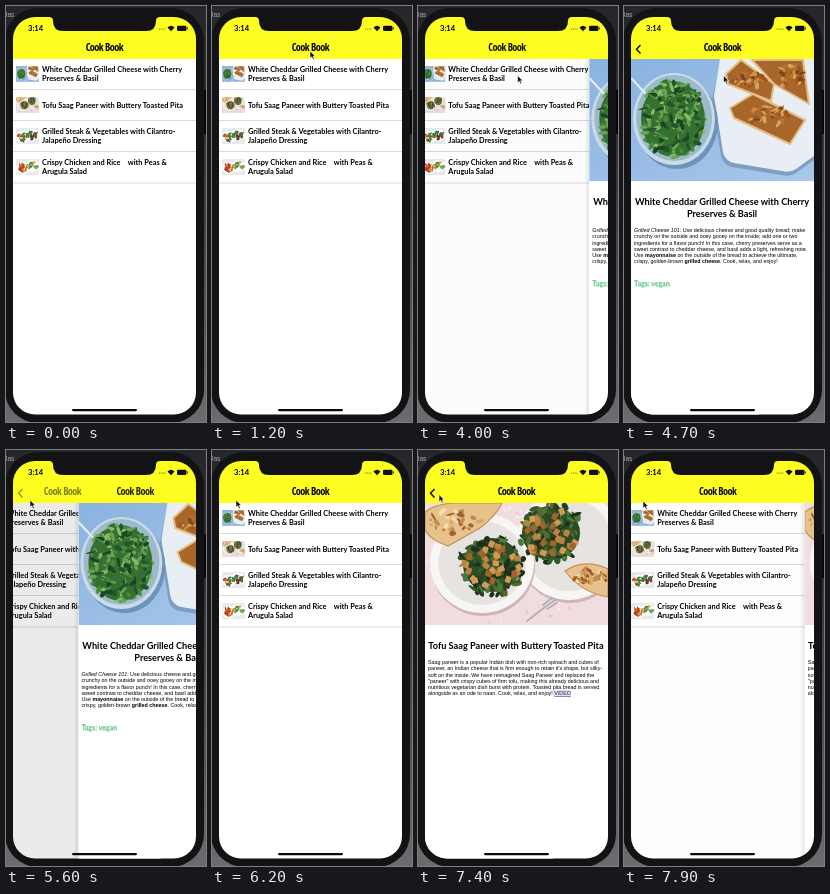
Recreate the animation shown at these times as an HTML page. Size 200x416 px, loop 8 s.

```html
<!DOCTYPE html>
<html lang="en">
<head>
<meta charset="utf-8">
<title>Cook Book</title>
<style>
  html, body { margin: 0; width: 100%; height: 100%; overflow: hidden; background: #222; }
  svg { display: block; width: 200px; height: 416px; }
  .bold { font-family: Lato, sans-serif; font-weight: 700; white-space: pre; }
  .row { font-size: 7.4px; }
  .heading { font-size: 9.2px; text-anchor: middle; }
  .title { font: 700 10.3px "Open Sans Condensed", "Roboto Condensed", Lato, sans-serif; letter-spacing: -.6px; text-anchor: middle; }
  .body { font: 5.35px "Liberation Sans", Arial, sans-serif; }
  .tags { font-size: 7px; fill: #74c79a; text-shadow: .5px .7px .8px #a5dfbf; }
</style>
</head>
<body>
<svg id="stage" viewBox="0 0 200 416" xmlns="http://www.w3.org/2000/svg"></svg>
<script>
const LOOP = 8000, STEP = 100, WIDTH = 183;
const BEZEL = '#131315', INK = '#111';

let seed = 7;
const random = () => (seed = (seed * 16807) % 2147483647) / 2147483647;
const pick = list => list[Math.floor(random() * list.length)];
const repeat = (n, make) => Array.from({ length: n }, (_, i) => make(i)).join('');
const rect = (x, y, w, h, fill, extra = '') =>
  `<rect x="${x}" y="${y}" width="${w}" height="${h}" fill="${fill}" ${extra}/>`;
const oval = (x, y, rx, ry, fill, extra = '') =>
  `<ellipse cx="${x}" cy="${y}" rx="${rx}" ry="${ry}" fill="${fill}" ${extra}/>`;
const shape = (d, fill, extra = '') => `<path d="${d}" fill="${fill}" ${extra}/>`;
const text = (x, y, cls, content) => `<text x="${x}" y="${y}" class="${cls}">${content}</text>`;

// Scatter small rotated blobs inside an ellipse.
const scatter = (n, x, y, rx, ry, colors, w, h, square) => repeat(n, () => {
  const a = random() * 2 * Math.PI, r = Math.sqrt(random());
  const px = x + rx * r * Math.cos(a), py = y + ry * r * Math.sin(a);
  const turn = `transform="rotate(${random() * 180} ${px} ${py})"`;
  return square
    ? rect(px - w / 2, py - h / 2, w, h, pick(colors), `rx="1" ${turn}`)
    : oval(px, py, w * (.5 + random()), h * (.5 + random()), pick(colors), turn);
});

const GREENS = ['#24552a', '#34702f', '#478a3c', '#66a352', '#1c4525'];
const SPINACH = ['#26401f', '#345a2a', '#1b2f19', '#56682f', '#4a7a3a'];
const CRUST = ['#b8722c', '#cd8f45', '#7c431b', '#d9a75f', '#95561f'];

const toast = d => shape(d, '#a9662a', 'stroke="#e3bd86" stroke-width="2" stroke-linejoin="round"');
const crumbs = (x, y, rx, ry) => scatter(32, x, y, rx, ry, CRUST, 2.6, 1.5);

function cheeseHero() {
  return rect(7, 53, WIDTH, 122, 'url(#blue)')
    + shape('M96 56H190V154L172 167Q166 171 158 169L108 161Q99 159 97 150L88 94Z', '#7d9fc5')
    + shape('M96 53H190V150L172 163Q166 167 158 165L110 157Q101 155 99 146L90 90Z', '#e9eef4')
    + oval(53, 117, 41, 46, '#6e93ba')
    + oval(50, 113, 41, 46, '#c9dbe6')
    + oval(50, 112, 38, 43, '#9dbacb')
    + oval(49, 113, 32, 38, '#34702f')
    + scatter(200, 49, 113, 33, 39, [...GREENS, '#86ba68'], 3.6, 1.6)
    + shape('M8 73L21 87', 'none', 'stroke="#e2ebf2" stroke-width="2.2" stroke-linecap="round"')
    + toast('M128 54H179L185 98L150 78Z') + crumbs(166, 71, 14, 12)
    + toast('M102 68L117 54L150 78L147 95L104 78Z') + crumbs(125, 74, 17, 8)
    + toast('M106 102L129 88L181 114L166 138L110 112Z') + crumbs(145, 110, 22, 10);
}

const naan = (d, x, y, rx, ry) => shape(d, '#e6c28c', 'stroke="#c98f52" stroke-width="1.2"')
  + scatter(36, x, y, rx, ry, ['#c58a4b', '#f3ddb5', '#d9aa6b', '#a2602f'], 3, 1.6);
const saag = (x, y) => oval(x, y, 29, 27, '#2c4a24')
  + scatter(110, x, y, 32, 30, SPINACH, 4, 2)
  + scatter(30, x, y, 28, 25, ['#bd8140', '#a26428', '#d29a55'], 6.5, 5.5, true);
const plate = (x, y, rx, ry) => oval(x + 1, y + 3, rx, ry, '#cdb5bb')
  + oval(x, y, rx, ry, '#f8f6f4') + oval(x, y, rx * .84, ry * .84, '#e6e3e0');

function tofuHero() {
  return rect(7, 53, WIDTH, 122, '#f1dde0')
    + scatter(160, 98, 114, 92, 61, ['#f8ecee', '#e6c8ce'], 2.4, .9)
    + plate(151, 95, 53, 55) + plate(64, 113, 52, 50)
    + naan('M7 62Q18 53 40 53H84Q78 66 62 78L30 96Q12 90 7 80Z', 38, 70, 26, 14)
    + saag(133, 83) + saag(74, 115)
    + naan('M147 121Q166 108 190 119V147Q164 143 147 121Z', 173, 127, 16, 9)
    + shape('M109 171L127 157M127 157L137 150M125 155L134 148M129 159L139 153', 'none',
        'stroke="#b5b0b6" stroke-width="1.8" stroke-linecap="round"');
}

const smallDish = (y, left, right) => rect(10, y, 23, 16, '#e8ebe9', 'rx="1"')
  + oval(17, y + 9, 7, 6, '#fff') + oval(26, y + 7, 7, 6, '#fff')
  + scatter(22, 17, y + 9, 5, 4, left, 1.5, 1) + scatter(22, 26, y + 7, 5, 4, right, 1.5, 1);
const thumbnail = (id, y) =>
  `<use href="#${id}" transform="translate(10 ${y}) scale(.1257 .131) translate(-7 -53)"/>`;

const ROWS = [
  [65.5, 'White Cheddar Grilled Cheese with Cherry', 'Preserves &amp; Basil'],
  [101.5, 'Tofu Saag Paneer with Buttery Toasted Pita'],
  [127.5, 'Grilled Steak &amp; Vegetables with Cilantro-', 'Jalapeño Dressing'],
  [158.7, 'Crispy Chicken and Rice \u2003with Peas &amp;', 'Arugula Salad']
];

function listView() {
  return rect(7, 53, WIDTH, 357, '#fff')
    + ROWS.map(([y, ...lines]) => lines.map((s, i) => text(36, y + i * 9.4, 'bold row', s)).join('')).join('')
    + [83, 114, 145, 176.5].map(y => rect(7, y, WIDTH, 1, '#d9d9d9')).join('')
    + thumbnail('cheese', 60) + thumbnail('tofu', 91)
    + smallDish(122, ['#b5432b', '#3d7e3c', '#d99a3c'], ['#5a3021', '#3d7e3c', '#7c4a30'])
    + smallDish(153, ['#c93d25', '#e0852f', '#8b4a22'], ['#3d7e3c', '#79a753', '#d9a24e']);
}

const paragraph = (y, lines) => lines.map((s, i) => text(10, y + i * 6.22, 'body', s)).join('');

const cheesePage = () => '<use href="#cheese"/>'
  + text(98, 199, 'bold heading', 'White Cheddar Grilled Cheese with Cherry')
  + text(98, 211.3, 'bold heading', 'Preserves &amp; Basil')
  + paragraph(226.2, [
    '<tspan font-style="italic">Grilled Cheese 101</tspan>: Use delicious cheese and good quality bread; make',
    'crunchy on the outside and ooey gooey on the inside; add one or two',
    'ingredients for a flavor punch! In this case, cherry preserves serve as a',
    'sweet contrast to cheddar cheese, and basil adds a light, refreshing note.',
    'Use <tspan font-weight="700">mayonnaise</tspan> on the outside of the bread to achieve the ultimate,',
    'crispy, golden-brown <tspan font-weight="700">grilled cheese</tspan>. Cook, relax, and enjoy!'
  ])
  + text(10, 280, 'bold tags', 'Tags: vegan');

const tofuPage = () => '<use href="#tofu"/>'
  + text(98, 199, 'bold heading', 'Tofu Saag Paneer with Buttery Toasted Pita')
  + rect(135, 240.3, 18, 5.8, '#dfe1e8')
  + paragraph(214.2, [
    'Saag paneer is a popular Indian dish with iron-rich spinach and cubes of',
    'paneer, an Indian cheese that is firm enough to retain it\'s shape, but silky-',
    'soft on the inside. We have reimagined Saag Paneer and replaced the',
    '"paneer" with crispy cubes of firm tofu, making this already delicious and',
    'nutritious vegetarian dish burst with protein. Toasted pita bread is served',
    'alongside as an ode to naan. Cook, relax, and enjoy! '
      + '<tspan fill="#1b1f78" text-decoration="underline">VIDEO</tspan>'
  ]);

const statusBar = () => text(22, 25.3, 'bold', '<tspan font-size="7.6">3:14</tspan>')
  + repeat(4, i => rect(153 + i * 1.8, 22.6, 1, 1, '#77760c'))
  + shape('M161.5 21.5Q165 18.2 168.5 21.5L165 25.2Z', INK)
  + rect(171, 19.8, 9.5, 5.2, INK, 'rx="1.3"') + rect(181, 21.4, .8, 2, INK);

document.getElementById('stage').innerHTML = `
  <defs>
    <linearGradient id="desk" x2="0" y2="1">
      <stop stop-color="#26272a"/><stop offset=".3" stop-color="#303032"/>
      <stop offset="1" stop-color="#6c6c6e"/>
    </linearGradient>
    <linearGradient id="blue" x2="1" y2="1">
      <stop stop-color="#8ab3e0"/><stop offset="1" stop-color="#a9c8ea"/>
    </linearGradient>
    <linearGradient id="shade">
      <stop stop-opacity="0"/><stop offset="1" stop-opacity=".1"/>
    </linearGradient>
    <clipPath id="screen"><rect x="7" y="11" width="${WIDTH}" height="397.5" rx="22"/></clipPath>
    <clipPath id="photo"><rect x="7" y="53" width="${WIDTH}" height="122"/></clipPath>
    <g id="cheese" clip-path="url(#photo)">${cheeseHero()}</g>
    <g id="tofu" clip-path="url(#photo)">${tofuHero()}</g>
  </defs>
  ${rect(0, 0, 200, 416, 'url(#desk)')}
  ${text(0, 11, 'body', '<tspan fill="#aaa" font-size="6.5">las</tspan>')}
  ${rect(197, 84, 3, 44, '#080808')}
  ${rect(-1, 2, 199, 415, BEZEL, 'rx="33"')}
  <g clip-path="url(#screen)">
    <g id="list">${listView()}</g>
    ${rect(7, 53, WIDTH, 357, '#000', 'id="dim"')}
    <g id="detail">
      ${rect(2, 53, 5, 357, 'url(#shade)')}
      ${rect(7, 53, WIDTH, 357, '#fff')}
      <g id="cheesePage">${cheesePage()}</g>
      <g id="tofuPage">${tofuPage()}</g>
    </g>
    ${rect(7, 11, WIDTH, 42, '#fdfd22')}
    ${statusBar()}
    <text id="listTitle" y="45.3" class="title">Cook Book</text>
    <text id="detailTitle" y="45.3" class="title">Cook Book</text>
    <path id="back" d="M16.5 39L12.5 43.3L16.5 47.6" fill="none" stroke="${INK}" stroke-width="1.5"/>
    ${shape('M43 11Q47 11 47 15Q47 25 57 25H140Q150 25 150 15Q150 11 154 11Z', BEZEL)}
    ${rect(66, 403, 65, 2.2, '#0a0a0a', 'rx="1.1"')}
  </g>
  <path id="cursor" d="M0 0V7.3L1.7 5.8L3 8.6L4.3 8L3.1 5.3H5.3Z"
    fill="${INK}" stroke="#fff" stroke-width=".6"/>`;

const $ = id => document.getElementById(id);

// Each slide: start time and whether it opens (push) or closes (pop) the detail page.
const SLIDES = [[3960, true], [5507, false], [6750, true], [7549, false]];

const CURSOR = [
  [1200, 98, 45], [1300, 118, 118], [1400, 124, 159.5], [2400, 124, 159.5],
  [2700, 138, 92], [2900, 84, 47], [3050, 33, 58], [3300, 99.5, 69.5],
  [5000, 99.5, 69.5], [5400, 14, 43], [5600, 24, 50], [6300, 24, 50],
  [6700, 48, 99], [7100, 48, 99], [7400, 21, 44.5], [7600, 15, 43], [7900, 19, 51]
];

const settle = ms => {
  const x = Math.max(0, ms) * .0135;
  return 1 - (1 + x) * Math.exp(-x);
};

// 0 when the detail page covers the list, 1 when the list is fully shown.
function listShare(t) {
  const slide = SLIDES.findLast(([start]) => start <= t);
  if (!slide) return 1;
  const p = settle(t - slide[0]);
  const share = slide[1] ? 1 - p : p;
  return share < .004 ? 0 : share > .996 ? 1 : share;
}

function cursorAt(t) {
  const next = CURSOR.findIndex(k => k[0] > t);
  if (next < 0) return CURSOR.at(-1).slice(1);
  const [t0, x0, y0] = CURSOR[next - 1], [t1, x1, y1] = CURSOR[next];
  const k = (t - t0) / (t1 - t0);
  return [x0 + (x1 - x0) * k, y0 + (y1 - y0) * k];
}

const move = (id, x, y = 0) => $(id).setAttribute('transform', `translate(${x} ${y})`);
const fade = (id, value) => $(id).setAttribute('opacity', Math.min(1, Math.max(0, value)));
const show = (id, on) => $(id).setAttribute('display', on ? 'inline' : 'none');

function draw(t) {
  const p = listShare(t);
  move('list', -.3 * WIDTH * (1 - p));
  fade('dim', .12 * (1 - p));
  move('detail', WIDTH * p);
  show('detail', p < 1);
  show('cheesePage', t < 6300);
  show('tofuPage', t >= 6300);

  move('listTitle', 98.3 - 48 * (1 - p * p));
  fade('listTitle', p ** .7);
  move('detailTitle', 98.3 + 60 * p ** .65);
  fade('detailTitle', 1.5 - 1.8 * p);
  fade('back', 1 - 1.7 * p);

  const visible = t >= CURSOR[0][0];
  show('cursor', visible);
  if (visible) move('cursor', ...cursorAt(t));
}

const begin = performance.now();
function tick() {
  const t = (performance.now() - begin) % LOOP;
  draw(Math.floor(t / STEP) * STEP);
  requestAnimationFrame(tick);
}
tick();
</script>
</body>
</html>
```
